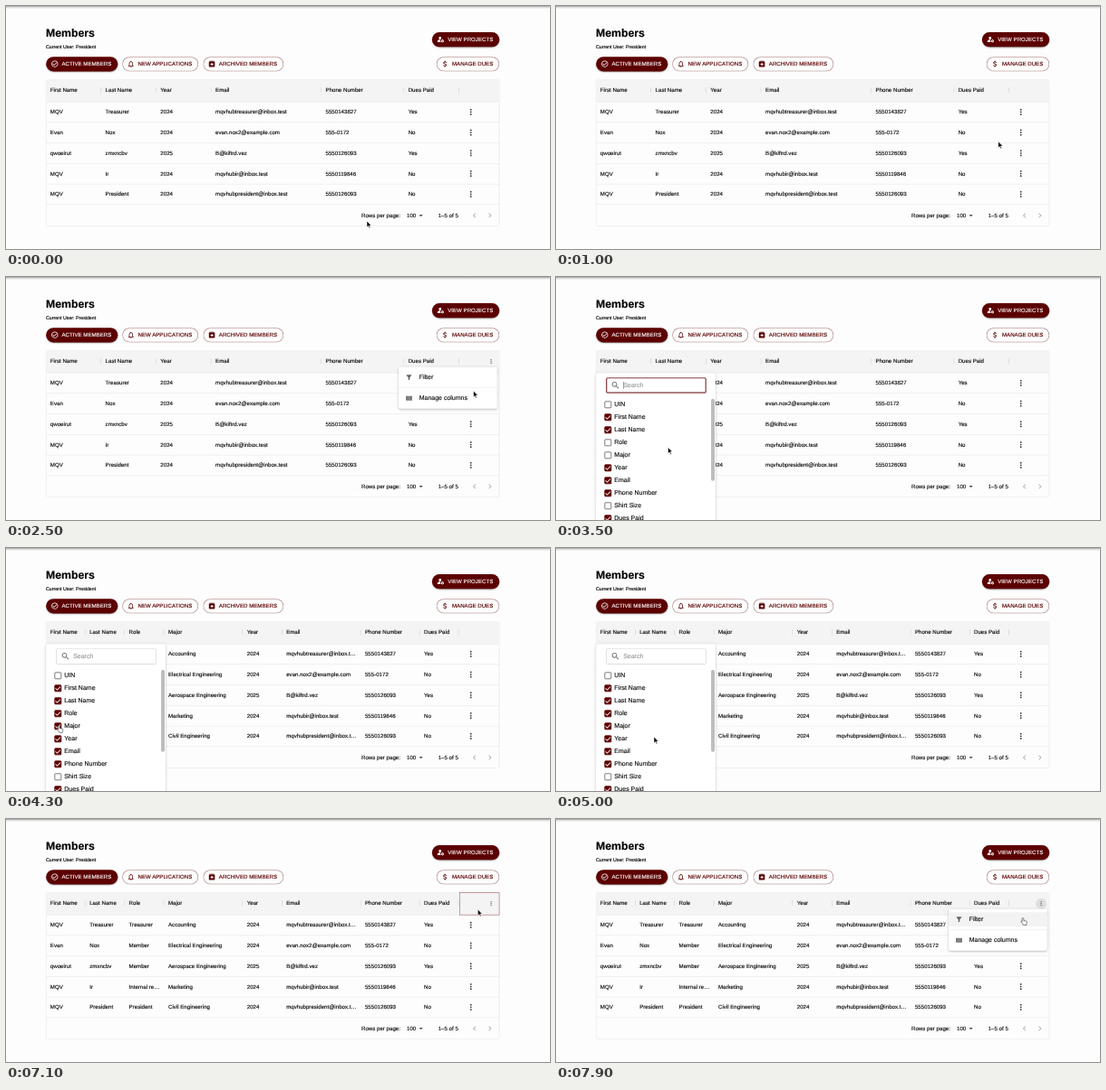
An HTML page that plays this animation: 600x269 px, repeating every 8000 ms.

```html
<!DOCTYPE html>
<html lang="en">
<head>
<meta charset="utf-8">
<title>Members</title>
<style>
html, body { margin: 0; width: 100%; height: 100%; overflow: hidden; background: #fdfdfd; }
#page {
  position: absolute; left: 0; top: 0; width: 1371.43px; height: 614.86px; overflow: hidden;
  transform: scale(.4375); transform-origin: 0 0; background: #fdfdfd; color: #111;
  font: 14px/20px "Liberation Sans", Arial, sans-serif; text-rendering: geometricPrecision;
  -webkit-text-stroke: .35px currentColor;
}
#page * { box-sizing: border-box; }
svg { display: block; fill: currentColor; flex: none; }
.at { position: absolute; white-space: nowrap; transform: translateY(-50%); }
.mid { transform: translate(-50%, -50%); }
.bar { position: absolute; left: 0; top: 0; width: 100%; height: 8px; background: linear-gradient(#999, #ddd 40%, #fdfdfd); }
.btn {
  display: flex; align-items: center; height: 37px; padding: 0 16px 0 12px; border-radius: 19px;
  color: #5c0000; box-shadow: inset 0 0 0 1.5px rgba(92, 0, 0, .5);
}
.btn svg { margin-right: 8px; }
.fill { background: #5c0000; color: #fff; box-shadow: 0 2px 3px rgba(0, 0, 0, .35); }
#grid {
  position: absolute; left: 100.6px; top: 185.5px; width: 1143.4px; height: 371px;
  border: 1.3px solid #dedede; border-radius: 4px;
}
.row { display: grid; height: 52px; border-bottom: 1.3px solid #dedede; align-items: center; }
.head { height: 56px; padding-bottom: 2px; background: #f4f4f4; }
.cell { padding: 0 10px; white-space: nowrap; overflow: hidden; text-overflow: ellipsis; }
.head .cell { position: relative; line-height: 52px; }
.head .cell::after { content: ""; position: absolute; right: 0; top: 19px; width: 2px; height: 14px; background: #d9d9d9; }
.act { padding-left: 17px; color: #333; }
#ring { position: absolute; left: 1143px; top: 186px; width: 101px; height: 56.5px; border: 1.6px solid #8a3030; }
#halo { width: 27px; height: 27px; border-radius: 50%; background: rgba(0, 0, 0, .09); }
.paper { position: absolute; background: #fff; border-radius: 4px; font-size: 16px;
  box-shadow: 0 3px 4px -1px rgba(0, 0, 0, .16), 0 2px 7px rgba(0, 0, 0, .1), 0 1px 10px rgba(0, 0, 0, .09); }
#menu { left: 989.5px; top: 228px; width: 248px; height: 105px; padding: 8px 0; transform-origin: 100% 0; }
.item { display: flex; align-items: center; height: 36px; padding-left: 16px; }
.item svg { margin-right: 16px; color: #666; }
.rule { height: 1px; margin: 8px 0; background: #e0e0e0; }
#panel { left: 101px; top: 242.5px; width: 301px; height: 420px; }
#search { position: absolute; left: 24.5px; top: 11px; width: 253px; height: 40px; border-radius: 4px;
  display: flex; align-items: center; padding-left: 12px; color: #999; }
#search svg { color: #666; margin-right: 8px; }
#caret { width: 1.5px; height: 18px; margin-right: -1.5px; background: #222; }
.thumb { position: absolute; left: 290px; top: 65px; width: 9px; height: 208px; border-radius: 4.5px; background: #bdbdbd; }
.box { width: 18px; height: 18px; border: 2px solid #666; border-radius: 2.5px; }
.box svg { display: none; margin: -2px; color: #fff; }
.on { background: #5c0000; border-color: #5c0000; }
.on svg { display: block; }
.cursor { position: absolute; left: 0; top: 0; overflow: visible; }
</style>
</head>
<body>
<div id="page"></div>
<script>
const SCALE = .4375, LOOP = 8000, STEP = 100;
const page = document.getElementById('page');

const icons = {
  check: 'M16.59 7.58 10 14.17l-3.59-3.58L5 12l5 5 8-8zM12 2C6.48 2 2 6.48 2 12s4.48 10 10 10 10-4.48 10-10S17.52 2 12 2m0 18c-4.42 0-8-3.58-8-8s3.58-8 8-8 8 3.58 8 8-3.58 8-8 8',
  bell: 'M12 22c1.1 0 2-.9 2-2h-4c0 1.1.9 2 2 2m6-6v-5c0-3.07-1.63-5.64-4.5-6.32V4c0-.83-.67-1.5-1.5-1.5s-1.5.67-1.5 1.5v.68C7.64 5.36 6 7.92 6 11v5l-2 2v1h16v-1zm-2 1H8v-6c0-2.48 1.51-4.5 4-4.5s4 2.02 4 4.5z',
  archive: 'M18 3H6L3 6.5V19a2 2 0 0 0 2 2h14a2 2 0 0 0 2-2V6.5zM12 17.5 6.5 12H10v-2h4v2h3.5zM5.12 5l.81-1h12l.94 1z',
  person: 'M10 4a4 4 0 1 0 0 8 4 4 0 0 0 0-8M2 20v-2.8C2 14.5 6 13 11 13a8 8 0 0 0 .5 7zM16 12h2v1.5l1.5.8 1.3-.7 1 1.7-1.3.8v1.8l1.3.8-1 1.7-1.3-.7-1.5.8V22h-2v-1.5l-1.5-.8-1.3.7-1-1.7 1.3-.8v-1.8l-1.3-.8 1-1.7 1.3.7 1.5-.8zM17 15.2a1.8 1.8 0 1 0 0 3.6 1.8 1.8 0 0 0 0-3.6',
  dollar: 'M11.8 10.9c-2.27-.59-3-1.2-3-2.15 0-1.09 1.01-1.85 2.7-1.85 1.78 0 2.44.85 2.5 2.1h2.21c-.07-1.72-1.12-3.3-3.21-3.81V3h-3v2.16c-1.94.42-3.5 1.68-3.5 3.61 0 2.31 1.91 3.46 4.7 4.13 2.5.6 3 1.48 3 2.41 0 .69-.49 1.79-2.7 1.79-2.06 0-2.87-.92-2.98-2.1h-2.2c.12 2.19 1.76 3.42 3.68 3.83V21h3v-2.15c1.95-.37 3.5-1.5 3.5-3.55 0-2.84-2.43-3.81-4.7-4.4',
  dots: 'M12 4a2 2 0 1 0 0 4 2 2 0 0 0 0-4m0 6a2 2 0 1 0 0 4 2 2 0 0 0 0-4m0 6a2 2 0 1 0 0 4 2 2 0 0 0 0-4',
  filter: 'M4.25 5.61C6.27 8.2 10 13 10 13v6c0 .55.45 1 1 1h2c.55 0 1-.45 1-1v-6s3.72-4.8 5.74-7.39A1 1 0 0 0 18.95 4H5.04c-.83 0-1.3.95-.79 1.61',
  columns: 'M14.67 5v14H9.33V5zm1 14H21V5h-5.33zm-7.34 0V5H3v14z',
  search: 'M15.5 14h-.8l-.3-.3a6.5 6.5 0 1 0-.7.7l.3.3v.8l5 5 1.5-1.5zm-6 0a4.5 4.5 0 1 1 0-9 4.5 4.5 0 0 1 0 9',
  tick: 'm7 14.5-5-5 1.4-1.4L7 11.7l7.6-7.6L16 5.5z',
  drop: 'm7 10 5 5 5-5z',
  prev: 'M15.4 7.4 14 6l-6 6 6 6 1.4-1.4L10.8 12z',
  next: 'M10 6 8.6 7.4l4.6 4.6-4.6 4.6L10 18l6-6z'
};

const icon = (name, size = 20, view = 24) =>
  `<svg width="${size}" height="${size}" viewBox="0 0 ${view} ${view}"><path d="${icons[name]}"/></svg>`;

function add(parent, cls, html = '', css = '') {
  const node = document.createElement('div');
  node.className = cls;
  node.innerHTML = html;
  node.style.cssText = css;
  parent.append(node);
  return node;
}
// Stage pixels in; y is the vertical centre.
const place = (x, y, html, css = '', cls = '') =>
  add(page, 'at ' + cls, html, `left:${x / SCALE}px;top:${y / SCALE}px;${css}`);
const named = (node, id) => { node.id = id; return node; };
const show = (node, on) => { node.style.visibility = on ? 'visible' : 'hidden'; };

// Heading and buttons
add(page, 'bar');
place(44, 30, 'Members', 'font:bold 28px/32px "Liberation Sans",Arial,sans-serif;color:#000');
place(44, 45.7, 'Current User: President', 'font-size:12px;color:#000');
const button = (x, y, name, text, cls = '') => place(x, y, icon(name) + text, '', 'btn ' + cls);
button(44, 64.3, 'check', 'ACTIVE MEMBERS', 'fill');
button(128, 64.3, 'bell', 'NEW APPLICATIONS');
button(217.3, 64.3, 'archive', 'ARCHIVED MEMBERS');
for (const b of [button(0, 37, 'person', 'VIEW PROJECTS', 'fill'), button(0, 64.3, 'dollar', 'MANAGE DUES')]) {
  b.style.left = 'auto';
  b.style.right = '127.4px';
}

// Table
const cols = [
  { name: 'First Name', flex: 1, data: ['MQV', 'Evan', 'qwoeirut', 'MQV', 'MQV'] },
  { name: 'Last Name', flex: 1, data: ['Treasurer', 'Nox', 'zmxncbv', 'Ir', 'President'] },
  { name: 'Role', flex: 1, from: 3900, data: ['Treasurer', 'Member', 'Member', 'Internal relations', 'President'] },
  { name: 'Major', flex: 2, from: 4300, data: ['Accounting', 'Electrical Engineering', 'Aerospace Engineering', 'Marketing', 'Civil Engineering'] },
  { name: 'Year', flex: 1, data: [2024, 2024, 2025, 2024, 2024] },
  { name: 'Email', flex: 2, data: ['mqvhubtreasurer@inbox.test', 'evan.nox2@example.com', 'B@kiftrd.vez', 'mqvhubir@inbox.test', 'mqvhubpresident@inbox.test'] },
  { name: 'Phone Number', flex: 1.5, data: ['5550143827', '555-0172', '5550126093', '5550119846', '5550126093'] },
  { name: 'Dues Paid', flex: 1, data: ['Yes', 'No', 'Yes', 'No', 'No'] }
];
const grid = named(add(page, ''), 'grid');
const rows = [];
for (let r = -1; r < 5; r++) {
  const row = add(grid, r < 0 ? 'row head' : 'row');
  const cells = cols.map(c => add(row, 'cell', r < 0 ? c.name : c.data[r]));
  add(row, 'act', r < 0 ? '' : icon('dots', 24));
  rows.push({ row, cells });
}
place(392, 232, 'Rows per page:');
place(442, 232, '100');
place(457.6, 232, icon('drop', 24), 'color:#555', 'mid');
place(476.7, 232, '1–5 of 5');
place(516.5, 232, icon('prev', 24), 'color:#aaa', 'mid');
place(533.8, 232, icon('next', 24), 'color:#aaa', 'mid');

const ring = named(add(page, ''), 'ring');
const halo = named(place(535.1, 93.6, '', '', 'mid'), 'halo');
const headDots = place(535.1, 93.6, icon('dots', 18), 'color:#555', 'mid');

// Header menu
const menu = named(add(page, 'paper'), 'menu');
const filterItem = add(menu, 'item', icon('filter') + 'Filter');
add(menu, 'rule');
const manageItem = add(menu, 'item', icon('columns') + 'Manage columns');

// Column chooser
const panel = named(add(page, 'paper'), 'panel');
const search = named(add(panel, '', icon('search', 24) + '<i id="caret"></i>Search'), 'search');
const caret = document.getElementById('caret');
add(panel, 'thumb');
const choices = ['UIN', 'First Name', 'Last Name', 'Role', 'Major', 'Year', 'Email', 'Phone Number', 'Shirt Size', 'Dues Paid'];
const boxes = choices.map((name, i) => {
  const y = 80.3 + 32 * i;
  add(panel, 'at', name, `left:46px;top:${y}px`);
  const box = add(panel, 'at box', icon('tick', 18, 18), `left:21px;top:${y}px`);
  return { box, col: cols.find(c => c.name === name) };
});

// Pointer
const pointer = (d, fill, line) =>
  add(page, 'cursor', `<svg width="20" height="22" style="overflow:visible"><path d="${d}" fill="${fill}" stroke="${line}" stroke-width="1.3"/></svg>`);
const arrow = pointer('M0 0v16l3.7-3.5 2.4 5.6 2.6-1.1-2.4-5.5h5z', '#000', '#fff');
const hand = pointer('M0 0c1.2 0 2 .8 2 2v5l6 1.2c1.2.3 2 1.2 2 2.4 0 3-1 4-1.5 7.4H1C-.5 14-4 11-5 9.5c0-1.5 2-1.5 3 0V2c0-1.2.8-2 2-2z', '#fff', '#222');

// time, x, y in stage pixels
const path = [
  [0, 398, 238], [200, 434, 198], [300, 434, 198], [800, 482, 157], [900, 482, 157],
  [1800, 534, 94.5], [2000, 534, 94.5], [2500, 515.5, 126], [2700, 504, 132], [3000, 504, 132],
  [3500, 123.5, 188.5], [3800, 59, 182], [3900, 59, 182], [4200, 58, 196], [4600, 60, 198],
  [4900, 60, 198], [5000, 108, 209], [5700, 228, 249.5], [6100, 228, 249.5],
  [6900, 493, 112], [7200, 534, 94], [7500, 534, 94], [7900, 515, 109.5], [8000, 515, 109.5]
];
function pointAt(t) {
  const i = path.findIndex(p => p[0] > t);
  const [t0, x0, y0] = path[i - 1], [t1, x1, y1] = path[i];
  const k = (t - t0) / (t1 - t0);
  return [x0 + (x1 - x0) * k, y0 + (y1 - y0) * k];
}
const within = (t, ...spans) => spans.some(([a, b]) => t >= a && t < b);
const fade = (t, start) => Math.min(1, Math.max(0, (t - start) / 200));

let shown = '';
function layout(t) {
  const open = cols.map(c => !c.from || t >= c.from);
  if (open.join() === shown) return;
  shown = open.join();
  const template = cols.filter((c, i) => open[i]).map(c => `minmax(0,${c.flex}fr)`).join(' ') + ' 100px';
  for (const { row, cells } of rows) {
    row.style.gridTemplateColumns = template;
    cells.forEach((cell, i) => { cell.style.display = open[i] ? '' : 'none'; });
  }
  for (const { box, col } of boxes) box.classList.toggle('on', !!col && open[cols.indexOf(col)]);
}

function draw(t) {
  layout(t);
  show(ring, within(t, [1900, 2000], [6100, 7500]));
  show(headDots, within(t, [1600, 3000], [7100, LOOP]));
  show(halo, within(t, [1700, 2000], [7200, LOOP]));

  const m = t < 3000 ? fade(t, 1900) : fade(t, 7400);
  menu.style.opacity = t >= 2900 && t < 7400 ? 0 : m;
  menu.style.transform = `scale(${.75 + .25 * m}, ${.56 + .44 * m})`;
  filterItem.style.background = t >= 7700 ? '#f3f3f3' : '';
  manageItem.style.background = within(t, [2600, 3000]) ? '#f3f3f3' : '';

  panel.style.opacity = t < 6100 ? fade(t, 2800) : 0;
  const typing = t < 3900;
  search.style.boxShadow = typing ? 'inset 0 0 0 2.6px #6a1010' : 'inset 0 0 0 1.3px #c4c4c4';
  show(caret, typing && panel.style.opacity > 0);

  const [x, y] = pointAt(t);
  const onLink = within(t, [1700, 2100], [2600, 3000], [3700, 4700], [7200, LOOP]);
  show(arrow, !onLink);
  show(hand, onLink);
  arrow.style.transform = hand.style.transform = `translate(${x / SCALE}px, ${y / SCALE}px)`;
}

const begin = performance.now();
function tick() {
  const t = (performance.now() - begin) % LOOP;
  draw(Math.floor(t / STEP) * STEP);
  requestAnimationFrame(tick);
}
tick();
</script>
</body>
</html>
```
